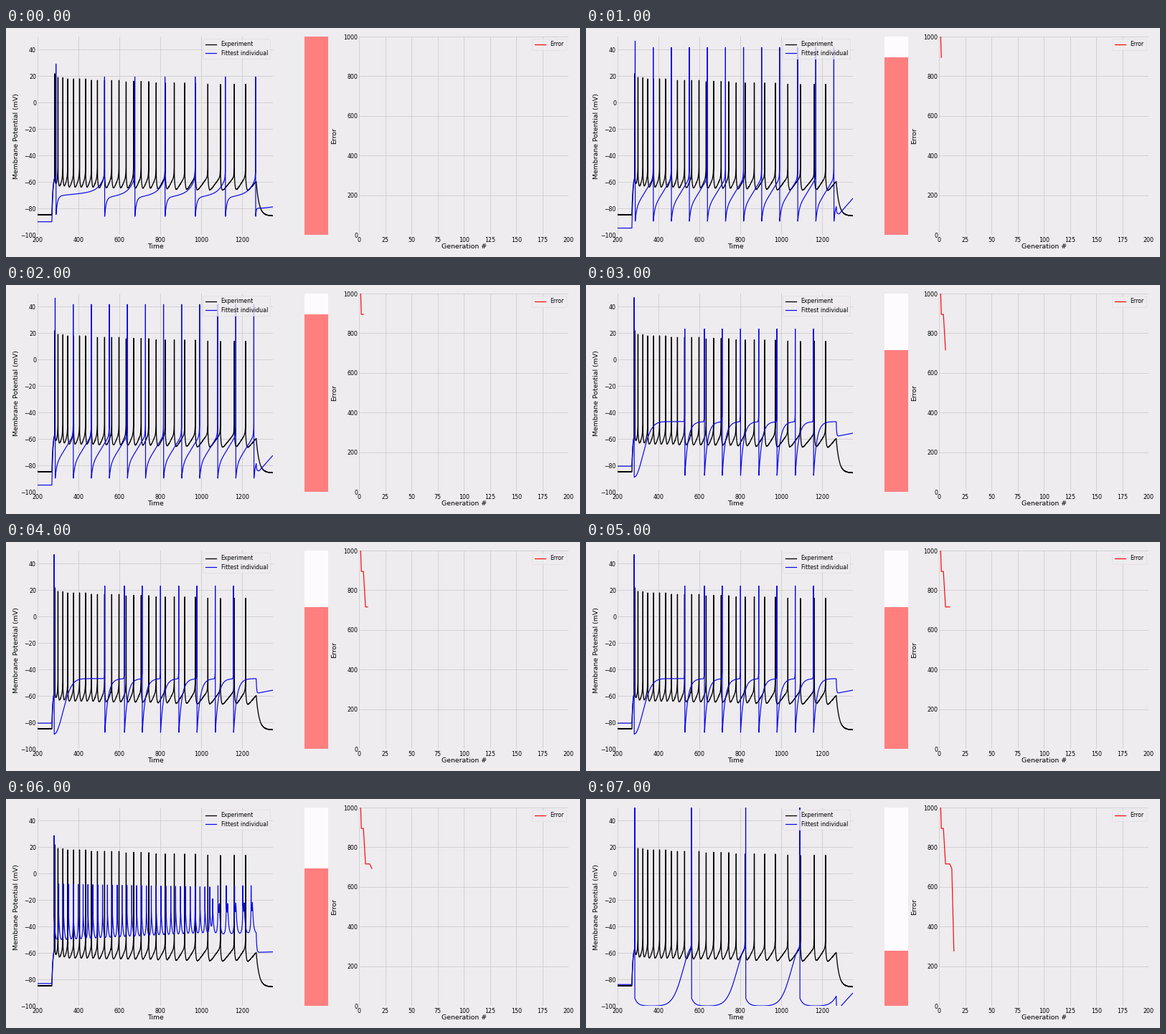
Recreate the animation shown at these times as a matplotlib script. Size 800 by 320 pixels, loop 8000 ms.

```python
import numpy as np
import matplotlib.pyplot as plt
from matplotlib.animation import FuncAnimation
from matplotlib.patches import Rectangle

W, H, DPI = 800, 320, 100
PX = 72 / DPI  # points per pixel
BACK, GRID = "#eeecef", "#cbcbcb"
BLUE, RED = "#0808ea", "#f80808"
SMALL, LARGE = 7.9 * PX, 9.4 * PX
T = np.arange(200, 1350.5, 0.5)
ON, OFF = 270, 1270  # stimulus, ms

plt.rcParams["font.family"] = "DejaVu Sans"


def decay(x, amp, tau, power):
    return amp * np.exp(-(np.maximum(x, 0) / tau) ** power)


def first_then(first, rest, n):
    return np.r_[first, np.full(n - 1, rest)]


def trace(base, times, peak, floor, ramp, dip, rise, tail):
    """Spike train in mV.

    Between spikes the voltage recovers from a dip, follows a ramp and rises
    to the next spike; dip and rise are (amplitude, tau, power), each one
    value or one per spike. tail is (level, tau, slope, start of slope).
    """
    times = np.round(2 * np.asarray(times)) / 2
    gaps = np.diff(times)
    gaps = np.append(gaps, max(gaps[-1], OFF + 20 - times[-1]))
    k = np.maximum(np.searchsorted(times, T, "right") - 1, 0)

    def pick(value):
        return np.broadcast_to(value, len(times))[k]

    since = T - times[k]
    left = gaps[k] - since
    v = (pick(floor) + ramp * since / gaps[k]
         + decay(since, *map(pick, dip)) + decay(left, *map(pick, rise))
         + decay(left, 8, 1.2, 1))

    lead, late = T < times[0], T > OFF
    v[lead] = -55 + decay(T[lead] - ON, base + 55, 5, 1)
    v[np.searchsorted(T, times)] = peak

    level, tau, slope, start = tail
    last = v[~late][-1]
    v[late] = (level + decay(T[late] - OFF, last - level, tau, 1)
               + slope * np.maximum(T[late] - start, 0))
    return v


def experiment():
    # Spike times adapt from fast to slow firing
    times = np.interp(np.arange(25), [0, 1, 3, 8, 12, 16, 18, 20, 22, 23, 24],
                      [284, 300, 347.5, 493, 633.5, 780.5, 869, 972, 1095,
                       1163, 1218])
    peak = first_then(22, 0, 25)
    peak[1:] = np.linspace(19.3, 14.2, 24)
    v = trace(-84.7, times, peak, floor=-68.8, ramp=12.8, dip=(15, 3.5, 1),
              rise=(2, 4, 1), tail=(-85.5, 14, 0, OFF))
    return v + np.random.default_rng(3).normal(0, 0.1, len(v))


def slow_spiker():
    return trace(-90, np.r_[290, np.linspace(528, 1267, 6)],
                 first_then(29.3, 19.5, 7), floor=first_then(-70.5, -72, 7),
                 ramp=3.5, dip=(-15, 7, 1), rise=(12, 27, 1),
                 tail=(-79.7, 3, 0.018, 1300))


def regular_spiker():
    return trace(-94.8, 286 + 88.4 * np.arange(12),
                 first_then(46.6, 41.8, 12), floor=-79.5, ramp=22,
                 dip=(-11, 6.7, 1), rise=(3, 4, 1),
                 tail=(-84, 2, 0.175, 1285))


def plateau_spiker():
    times = np.r_[281, 529, 625, 712 + 89.4 * np.arange(6)]
    n = len(times)
    return trace(-80.5, times, first_then(47, 23.3, n), floor=-46.8, ramp=0,
                 dip=(-42, first_then(60, 15.5, n), first_then(2, 1, n)),
                 rise=(0, 1, 1), tail=(-58, 2, 0.03, OFF))


def fast_spiker():
    pairs = np.add.outer(np.linspace(1083, 1245, 5), [0, 7]).ravel()
    times = np.r_[281, np.linspace(303.6, 1042.6, 32), 1057, pairs]
    peak = np.r_[28.9, np.linspace(-7.8, -10, 32), -19, np.tile([-9, -25], 5)]
    return trace(-83, times, peak, floor=-52.5 + 0.0075 * (times - 281),
                 ramp=0, dip=(22, 5, 1), rise=(14, 4, 1),
                 tail=(-59.5, 2.5, 0.005, OFF))


def deep_spiker():
    return trace(-83.8, [284, 562, 827, 1092], 70, floor=-100, ramp=0,
                 dip=(6, 15, 1), rise=(44, 63, 1.8),
                 tail=(-101.5, 1, 0.17, 1285))


# Best model and its error after every second generation
s, r, p, f, d = (make() for make in (slow_spiker, regular_spiker,
                                     plateau_spiker, fast_spiker, deep_spiker))
best = [s, r, r, p, p, p, f, d]
errors = [1245, 895, 895, 716, 716, 716, 693, 277]
gens = [2 * k for k in range(len(errors))]

fig = plt.figure(figsize=(W / DPI, H / DPI), dpi=DPI, facecolor=BACK)


def panel(x0, x1, xlim, ylim, xticks, yticks, face=BACK):
    top, bottom = 12, 289.2
    ax = fig.add_axes([x0 / W, 1 - bottom / H, (x1 - x0) / W,
                       (bottom - top) / H], facecolor=face)
    ax.set(xlim=xlim, ylim=ylim, xticks=xticks, yticks=yticks)
    ax.spines[:].set_visible(False)
    ax.tick_params(length=0, pad=2, labelsize=SMALL)
    ax.tick_params(axis="y", pad=1.4)
    ax.set_axisbelow(True)
    ax.grid(color=GRID, lw=0.8 * PX)
    return ax


def label(x, y, text, rotation=0):
    fig.text(x / W, 1 - y / H, text, size=LARGE, rotation=rotation,
             ha="center", va="center")


def legend(ax):
    ax.legend(loc="upper right", fontsize=SMALL, facecolor=BACK,
              edgecolor="#dddbde", labelspacing=0.4, borderaxespad=0.42
              ).get_frame().set_linewidth(0.8 * PX)


volts = panel(44, 371.5, (200, 1350), (-100, 50),
              range(200, 1201, 200), range(-100, 41, 20))
meter = panel(415.6, 449, (0, 1), (0, 1000), [], [], "#fdfbfe")
curve = panel(492.3, 784.3, (0, 200), (0, 1000),
              range(0, 201, 25), range(0, 1001, 200))

label(208.5, 306, "Time")
label(14, 151, "Membrane Potential (mV)", 90)
label(638.5, 306, "Generation #")
label(457.5, 151, "Error", 90)

volts.plot(T, experiment(), color="black", lw=1.3 * PX, label="Experiment")
fit, = volts.plot([], [], color=BLUE, lw=1.2 * PX, label="Fittest individual")
error_line, = curve.plot([], [], color=RED, lw=1.2 * PX, label="Error")
bar = meter.add_patch(Rectangle((0, 0), 1, 1000, color="#ff7f7f", lw=0))
legend(volts)
legend(curve)


def update(k):
    fit.set_data(T, best[k])
    error_line.set_data(gens[:k + 1], errors[:k + 1])
    bar.set_height(min(errors[k], 1000))
    return fit, error_line, bar


anim = FuncAnimation(fig, update, frames=len(errors), interval=1000,
                     repeat=True)
plt.show()
```
